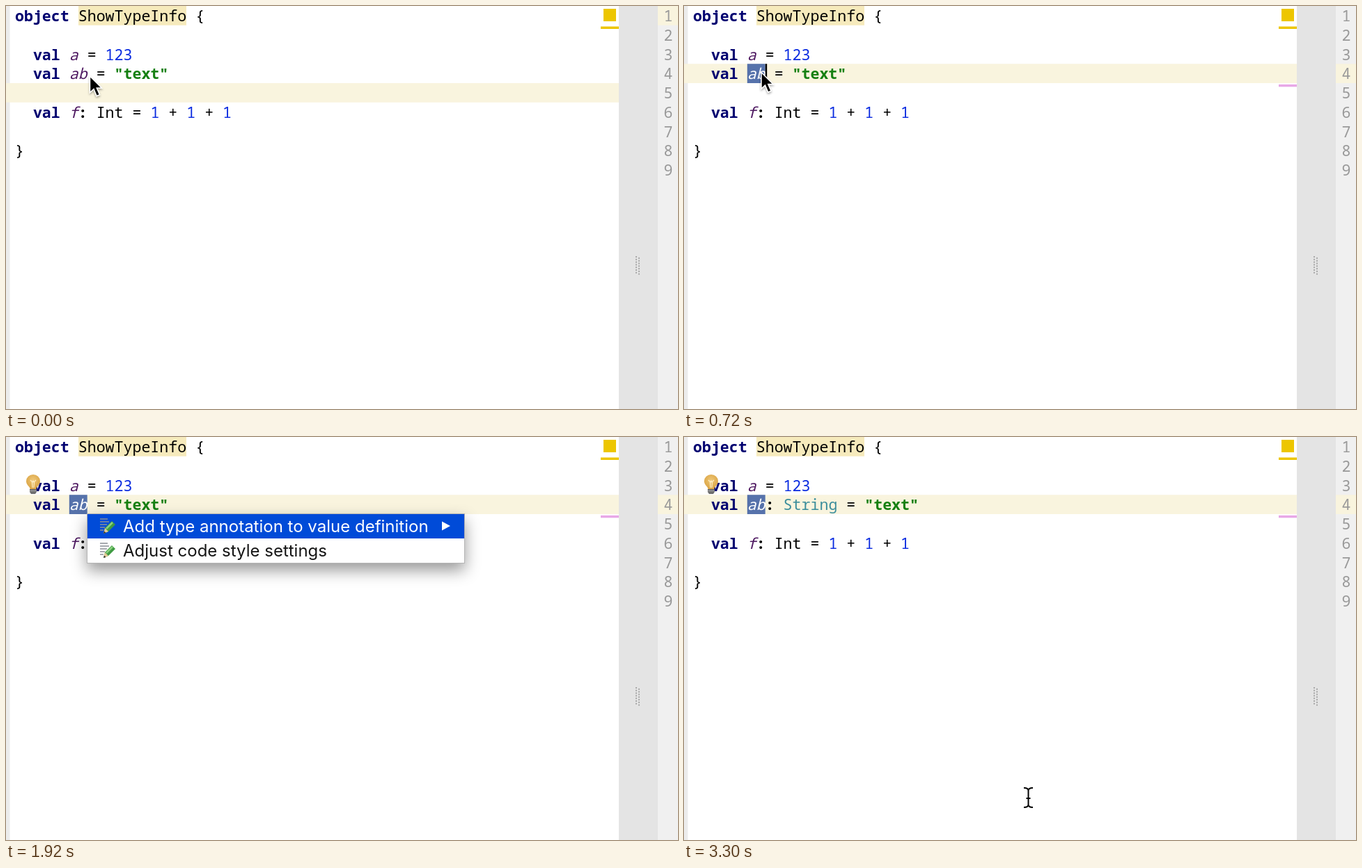
An HTML page for the animation above (3.36 s loop, 965 px wide and 580 px high).

```html
<!DOCTYPE html>
<html lang="en">
<head>
<meta charset="utf-8">
<title>Add type annotation</title>
<style>
  html, body { margin: 0; width: 100%; height: 100%; overflow: hidden; background: #fff; }
  svg { display: block; }
  text { white-space: pre; }
  .code { font: 21.6px "Noto Sans Mono", "DejaVu Sans Mono", monospace; }
  .menu { font: 24px Inter, Roboto, sans-serif; }
  .kw { font-weight: bold; fill: #000070; }
  .id { font-style: italic; fill: #4f1a62; }
  .num { fill: #0a2be0; }
  .str { font-weight: bold; fill: #168012; }
  .b { font-weight: bold; }
  .no { fill: #999; }
</style>
</head>
<body>
<svg width="965" height="580" viewBox="0 0 965 580">
  <defs>
    <filter id="shade" x="-20%" y="-50%" width="140%" height="220%">
      <feDropShadow dx="0" dy="10" stdDeviation="11" flood-opacity=".4"/>
    </filter>
    <filter id="soft" x="-50%" y="-50%" width="200%" height="200%">
      <feDropShadow dx="0" dy="2" stdDeviation="1.5" flood-opacity=".35"/>
    </filter>
    <radialGradient id="glass" cx=".5" cy=".4" r=".6">
      <stop offset="0" stop-color="#f0c878"/>
      <stop offset="1" stop-color="#d9a343"/>
    </radialGradient>
    <g id="pencil">
      <path d="M0 1H11M0 5H13M0 9H10M0 13H7M0 17H5" stroke="#8b8f96" stroke-width="1.6"/>
      <path d="M5 22L7 14L17 4L22 9L12 19Z" fill="#3f9b42"/>
      <path d="M9 15L18 6" stroke="#8bd07f" stroke-width="2.5"/>
      <path d="M5 22L7 14L12 19Z" fill="#e6c998"/>
      <path d="M5 22L6 18.5L8.5 21Z" fill="#333"/>
    </g>
  </defs>

  <rect width="965" height="580" fill="#fff"/>
  <rect width="5.5" height="580" fill="#ececec"/>
  <rect x="880" width="56" height="580" fill="#e4e4e4"/>
  <rect x="936" width="29" height="580" fill="#f0f0f0"/>
  <rect id="row" width="880" height="27.75" fill="#f9f4de"/>
  <rect id="mark" x="936" width="29" height="27.75" fill="#f9f4de"/>
  <rect x="104" width="155" height="27.75" fill="#f6eabc"/>
  <rect id="sel" x="90.8" y="83.25" width="25.9" height="27.75" fill="#5672ab"/>
  <g id="grip" fill="#a8a8a8"></g>

  <g id="code" class="code"></g>
  <g id="before" class="code"></g>
  <g id="after" class="code"></g>
  <rect id="caret" y="83.25" width="2.4" height="27.75"/>

  <rect id="square" x="858" y="4" width="18" height="18" fill="#edc600"/>
  <g id="eye">
    <path d="M856.500 13Q867 0 877.500 13Q867 26 856.500 13Z" fill="#7d7d7d"/>
    <circle cx="867" cy="13" r="5.300" fill="#fff"/>
    <circle cx="867" cy="13" r="3.400" fill="#6e6e6e"/>
  </g>
  <rect x="854" y="29.500" width="26" height="3.500" fill="#edc600"/>
  <rect id="pink" x="854" y="112.800" width="26" height="3.500" fill="#e8a8e6"/>

  <g id="bulb">
    <path d="M34.500 75C34.500 71 29 69.500 29 63.500A10 9.500 0 0 1 49 63.500C49 69.500 43.500 71 43.500 75Z" fill="url(#glass)"/>
    <path d="M35 62L38 65L39 63L40 65L43 62M37.500 65L38 73M40.500 65L40 73" fill="none" stroke="#fff0c8" stroke-width="1.200"/>
    <path d="M34 75H44V79L42 82H36L34 79Z" fill="#6f6f6f"/>
    <path d="M34 77.500H44" stroke="#aaa"/>
  </g>

  <g id="popup" class="menu">
    <rect x="116.500" y="110.500" width="542" height="71" fill="#fff" stroke="#b4b4b4" filter="url(#shade)"/>
    <rect x="117" y="111" width="541" height="35" fill="#004bd8"/>
    <use href="#pencil" x="135" y="117"/>
    <use href="#pencil" x="135" y="152"/>
    <text x="168" y="136.500" fill="#fff">Add type annotation to value definition</text>
    <text x="168" y="171.500" fill="#151515">Adjust code style settings</text>
    <path d="M626 121.500L638 128L626 134.500Z" fill="#fff"/>
  </g>

  <path id="mouse" d="M0 0V23.500L5.500 18.500L9.700 28.500L14 26.700L9.800 17H17Z"
        stroke="#fff" stroke-width="1.500" filter="url(#soft)"/>
  <path id="beam" d="M488 505Q494.500 505 494.500 509V529Q494.500 533 488 533M501 505Q494.500 505 494.500 509M494.500 529Q494.500 533 501 533M491.500 520H497.500"
        fill="none" stroke="#000" stroke-width="2"/>
</svg>
<script>
const LOOP = 3360, STEP = 60, LINE = 27.75, CHAR = 12.96;
const $ = id => document.getElementById(id);

function put(parent, text, x, y, cls = "") {
  const node = document.createElementNS("http://www.w3.org/2000/svg", "text");
  node.setAttribute("x", x);
  node.setAttribute("y", y);
  node.setAttribute("class", cls);
  node.textContent = text;
  $(parent).append(node);
  return node;
}

// Lay out [text, class] tokens on the character grid; returns the nodes.
function write(parent, line, col, ...tokens) {
  return tokens.map(([text, cls]) => {
    const node = put(parent, text, 13 + col * CHAR, 22 + (line - 1) * LINE, cls);
    col += text.length + 1;
    return node;
  });
}

const val = ["val", "kw"], eq = ["="], plus = ["+"], one = ["1", "num"];
write("code", 1, 0, ["object", "kw"], ["ShowTypeInfo"], ["{"]);
write("code", 3, 2, val, ["a", "id"], eq, ["123", "num"]);
const name = write("code", 4, 2, val, ["ab", "id"])[1];
write("code", 6, 2, val, ["f", "id"]);
write("code", 6, 7, [":", "b"], ["Int"], eq, one, plus, one, plus, one);
write("code", 8, 0, ["}"]);
write("before", 4, 9, eq, ['"text"', "str"]);
const type = write("after", 4, 8, [":", "b"], ["String"], eq, ['"text"', "str"])[1];
for (let n = 1; n < 10; n++) put("code", n, 944.500, 22 + (n - 1) * LINE, "no");

for (let i = 0; i < 14; i++) {
  const dot = document.createElementNS("http://www.w3.org/2000/svg", "rect");
  dot.setAttribute("x", i % 2 ? 908 : 904);
  dot.setAttribute("y", 360 + i * 1.900);
  dot.setAttribute("width", 2);
  dot.setAttribute("height", 2);
  $("grip").append(dot);
}

const show = (id, on) => $(id).style.display = on ? "" : "none";
const CLICK = 240, SELECT = 420, OPEN = 1560, INSERT = 2340, DONE = 2700;

function draw(t) {
  const within = (a, b) => t >= a && t < b;
  const selected = t >= SELECT, inserted = t >= INSERT;

  $("row").setAttribute("y", (t < CLICK ? 4 : 3) * LINE);
  $("mark").setAttribute("y", selected ? 3 * LINE : 0);
  show("sel", selected);
  show("pink", selected);
  name.style.fill = selected ? "#fff" : "";
  show("before", !inserted);
  show("after", inserted);
  type.style.fill = t >= DONE ? "#3c8e9c" : "#000";

  $("caret").setAttribute("x", selected ? 116.800 : 103.300);
  show("caret", within(CLICK, 920) || within(INSERT, 2840));
  show("eye", within(INSERT, DONE));
  show("square", !within(INSERT, DONE));
  show("bulb", within(1020, INSERT) || t >= 2940);
  show("popup", within(OPEN, INSERT));

  const p = Math.min(t / 180, 1);
  $("mouse").setAttribute("transform", `translate(${120.500 - 9.500 * p} ${101 - 5.500 * p})`);
  show("mouse", t < OPEN);
  show("beam", t >= 3300);
}

function tick() {
  const t = performance.now() % LOOP;
  draw(Math.floor(t / STEP) * STEP);
  requestAnimationFrame(tick);
}
tick();
</script>
</body>
</html>
```
